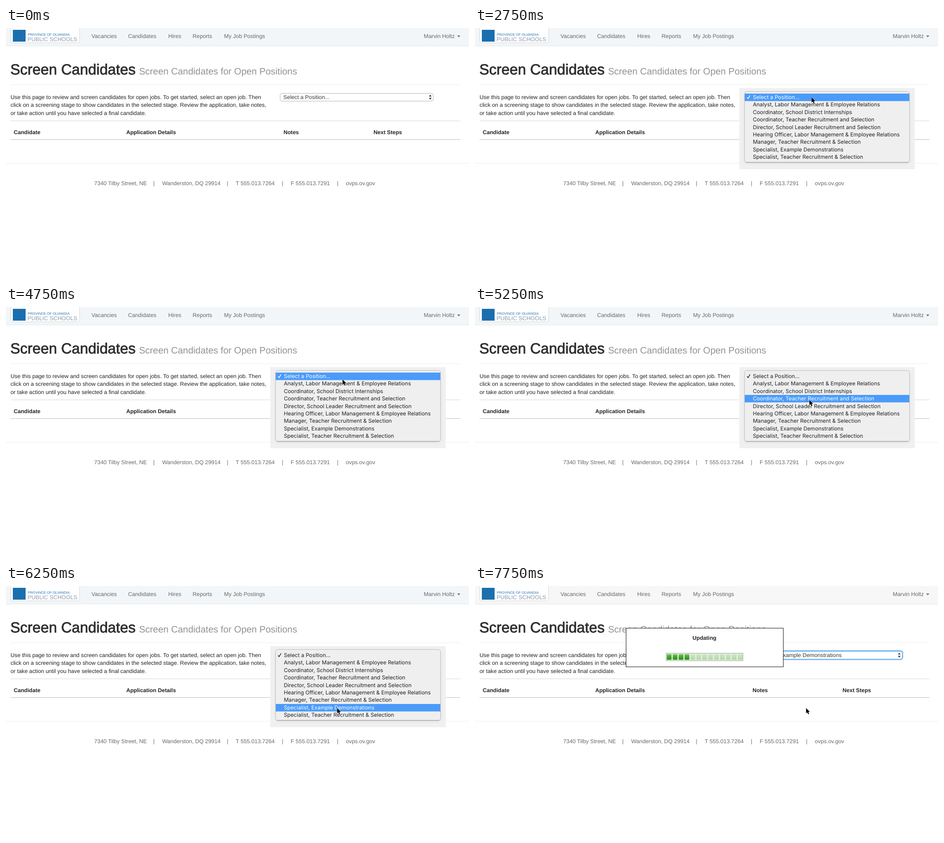
An HTML page that plays this animation: 1016x551 px, repeating every 8000 ms.

```html
<!DOCTYPE html>
<html lang="en">
<head>
<meta charset="utf-8">
<title>Screen Candidates</title>
<style>
  html, body { margin: 0; width: 100%; height: 100%; overflow: hidden; background: #fff; }
  svg { display: block; width: 100%; height: 100%; }
  text { font: 12.26px "Liberation Sans", Arial, sans-serif; fill: #242424; text-rendering: geometricPrecision; white-space: pre; }
  .nav text, .foot text { fill: #686868; }
  .bold text, text.bold { font-weight: bold; font-size: 12.1px; }
  .menu text { font: 11.79px Inter, sans-serif; fill: #222; }
  .menu text.on { fill: #fff; }
  .mid { text-anchor: middle; }
</style>
</head>
<body>
<svg id="stage" viewBox="0 0 1016 551">
  <defs>
    <filter id="blur" x="-10%" y="-20%" width="120%" height="140%"><feGaussianBlur stdDeviation="3"/></filter>
    <linearGradient id="lit" x2="0" y2="1"><stop stop-color="#7cc86c"/><stop offset=".5" stop-color="#3fa52c"/><stop offset="1" stop-color="#2f8f1f"/></linearGradient>
    <linearGradient id="dim" x2="0" y2="1"><stop stop-color="#cfe7c8"/><stop offset="1" stop-color="#b3d6a8"/></linearGradient>
  </defs>

  <rect id="bar" width="1016" height="39"/>
  <path d="M0 39.5H1016" stroke="#d3d9dc" stroke-dasharray="2 1"/>
  <rect x="10.5" y="-3.5" width="151" height="36" rx="4" fill="#fff" stroke="#d8d8d8"/>
  <rect x="15" y="4" width="28" height="26" fill="#1b6fae"/>
  <text x="48" y="17" style="font-size:7.6px;fill:#2272b0">PROVINCE OF OLVANDIA</text>
  <text x="47.5" y="28.5" style="font-size:12.4px;fill:#8b9cae">PUBLIC SCHOOLS</text>
  <g class="nav" id="nav"></g>
  <path d="M990 16.5h7l-3.5 3.7z" fill="#686868"/>

  <text x="9.5" y="102" style="font-size:32.35px;fill:#2e2e2e;stroke:#2e2e2e;stroke-width:.85px">Screen Candidates</text>
  <text x="292" y="102" style="font-size:20.4px;fill:#929292">Screen Candidates for Open Positions</text>
  <path d="M10 124.5H997" stroke="#e6e6e6" stroke-dasharray="2 1"/>
  <g id="intro"></g>

  <rect id="ring" x="600.5" y="142" width="338" height="19.5" rx="5" fill="none" stroke="#8ec3f5" stroke-width="2.5"/>
  <rect id="box" x="601.5" y="143.5" width="336" height="17" rx="4" fill="#fff"/>
  <text id="choice" x="608.5" y="156" style="fill:#3c3c3c"></text>
  <path d="M928 150.5h6l-3-4.2zM928 153.2h6l-3 4.2z" fill="#444"/>

  <path d="M10 203.8H997" stroke="#d8d8d8"/>
  <g class="bold" id="heads"></g>
  <path d="M10 244.7H997" stroke="#d0d0d0" stroke-width="1.6"/>
  <path d="M0 297H1016" stroke="#e2e2e2" stroke-dasharray="2 1"/>
  <g class="foot" id="foot"></g>

  <g class="menu" id="menu">
    <path d="M580 132H965V310H580z" fill="#f0f0f0"/>
    <rect x="592" y="142" width="361" height="154" rx="5" fill="#000" opacity=".1" filter="url(#blur)"/>
    <rect x="591.5" y="139.5" width="362" height="155.5" rx="5" fill="#efefef" stroke="#bdbdbd"/>
    <path d="M594 295H951" stroke="#9a9a9a"/>
    <rect id="mark" x="592" width="361" height="16.4" fill="#4a9bfa"/>
    <path id="tick" d="M597 152.2l2.3 3 4.2-7.4" fill="none" stroke-width="1.5"/>
  </g>

  <g id="modal">
    <rect x="331.5" y="92.5" width="345" height="85" fill="#fff" stroke="#111"/>
    <text class="bold mid" x="503.5" y="118">Updating</text>
    <rect x="419.5" y="147.5" width="168.5" height="16.5" fill="#e4f1df" stroke="#9aa597"/>
  </g>
  <path id="cursor" d="M0 0V11.6L2.6 9.2 4.6 13.6 6.6 12.7 4.7 8.4H8.3z" fill="#000" stroke="#fff" stroke-width="1" paint-order="stroke"/>
</svg>
<script>
const $ = id => document.getElementById(id);

function add(parent, tag, attrs, text = "") {
  const el = document.createElementNS("http://www.w3.org/2000/svg", tag);
  for (const k in attrs) el.setAttribute(k, attrs[k]);
  el.textContent = text;
  return $(parent).appendChild(el);
}
const row = (parent, y, items) => items.forEach(([x, s]) => add(parent, "text", { x, y }, s));

row("nav", 21.7, [[187.5, "Vacancies"], [267.9, "Candidates"], [356, "Hires"], [409.5, "Reports"],
  [478.5, "My Job Postings"], [916.8, "Marvin Holtz"]]);
row("heads", 232.7, [[17, "Candidate"], [264, "Application Details"], [609, "Notes"], [806.5, "Next Steps"]]);
row("foot", 345.3, [[193.5, "7340 Tilby Street, NE"], [342.7, "Wanderston, DQ 29914"], [504, "T 555.013.7264"],
  [624.7, "F 555.013.7291"], [745.7, "ovps.ov.gov"]]);
for (const x of [324.7, 486, 606.8, 727.8]) add("foot", "text", { x, y: 345.3, class: "mid" }, "|");

["Use this page to review and screen candidates for open jobs. To get started, select an open job. Then",
 "click on a screening stage to show candidates in the selected stage. Review the application, take notes,",
 "or take action until you have selected a final candidate."
].forEach((s, i) => add("intro", "text", { x: 10, y: 156 + 17.3 * i }, s));

const PITCH = 16.43;
const options = ["Select a Position...",
  "Analyst, Labor Management & Employee Relations",
  "Coordinator, School District Internships",
  "Coordinator, Teacher Recruitment and Selection",
  "Director, School Leader Recruitment and Selection",
  "Hearing Officer, Labor Management & Employee Relations",
  "Manager, Teacher Recruitment & Selection",
  "Specialist, Example Demonstrations",
  "Specialist, Teacher Recruitment & Selection"];
const labels = options.map((s, i) => add("menu", "text", { x: 609.7, y: 155.8 + PITCH * i }, s));

for (let i = 0; i < 13; i++)
  add("modal", "rect", { x: 421 + 12.95 * i, y: 149.5, width: 10.4, height: 12.6, rx: 1.5, fill: `url(#${i < 4 ? "lit" : "dim"})` });

// pointer stops: time, x, y, hovered option
const stops = [[750, 746.5, 15.5, 0], [1000, 742, 110, 0], [1250, 739.5, 152.3, 0], [1500, 739, 153, 0],
  [2750, 738.5, 152, 0], [4750, 738.5, 159, 0], [5000, 737, 175, 1], [5250, 733.7, 204, 3],
  [5500, 730.5, 231, 5], [5750, 728, 252, 6], [6000, 726.5, 269, 7], [6250, 726.5, 268, 7]];

const show = (id, on) => $(id).setAttribute("visibility", on ? "visible" : "hidden");

function draw(t) {
  const stop = stops.filter(s => s[0] <= t).pop();
  show("cursor", stop);
  const [, x, y, hover] = stop || stops[0];
  $("cursor").setAttribute("transform", `translate(${x} ${y})`);

  $("menu").style.display = t >= 2750 && t < 7500 ? "" : "none";
  $("menu").setAttribute("opacity", t < 7250 ? 1 : 0.5);
  $("mark").setAttribute("y", Math.round(143.6 + PITCH * hover));
  $("tick").setAttribute("stroke", hover ? "#222" : "#fff");
  labels.forEach((el, i) => el.setAttribute("class", i === hover ? "on" : ""));

  const focus = t >= 7500, loading = t >= 7750;
  $("bar").setAttribute("fill", focus ? "#f7f7f7" : "#f2f6f8");
  $("box").setAttribute("stroke", focus ? "#5aa5ea" : "#b3b3b3");
  show("ring", focus);
  show("modal", loading);
  $("choice").textContent = options[loading ? 7 : 0];
}

let start;
function tick(now) {
  start ??= now;
  draw((now - start) % 8000);
  requestAnimationFrame(tick);
}
draw(0);
requestAnimationFrame(tick);
</script>
</body>
</html>
```
